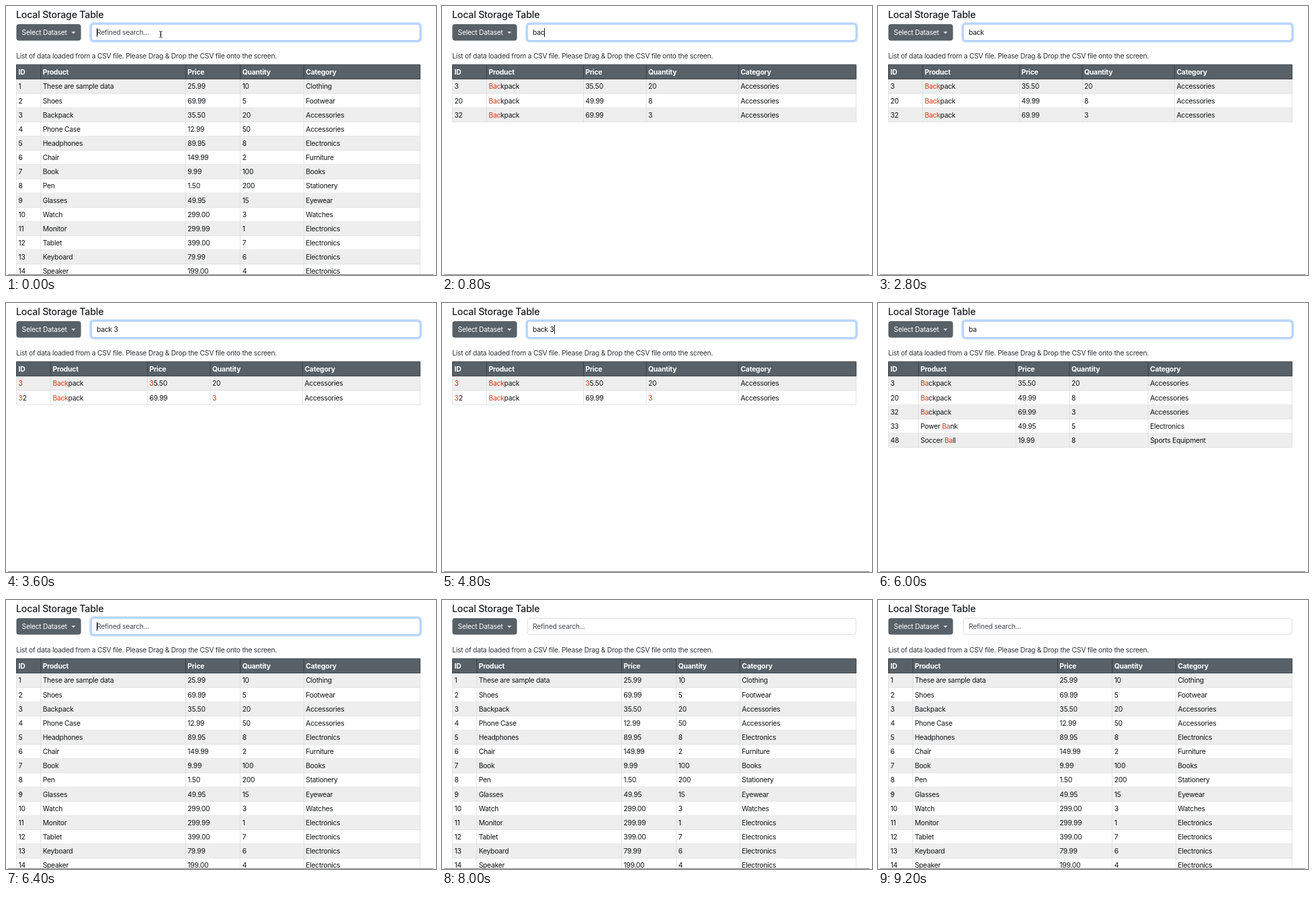
Write an HTML page that moves like this. It is 640 by 400 pixels and loops after 9.6 s.

```html
<!DOCTYPE html>
<html lang="en">
<head>
<meta charset="utf-8">
<title>Local Storage Table</title>
<style>
  html, body { margin: 0; width: 100%; height: 100%; overflow: hidden; background: #fff; }
  svg { display: block; width: 640px; height: 400px; }
  text {
    font: 400 10.35px Inter, "Liberation Sans", sans-serif;
    letter-spacing: -0.27px;
    fill: #111315;
    white-space: pre;
  }
  .title { font-size: 14.2px; font-weight: 500; letter-spacing: -0.2px; fill: #1c1f22; }
  .note { fill: #2f3336; }
  .light { fill: #fff; }
  .head { font-weight: 700; letter-spacing: -0.2px; fill: #fff; }
  .hint { fill: #45494d; }
  .hit { fill: #dc3513; }
  .dark { fill: #586168; }
  .stripe { fill: #eeeeee; }
  .rule { stroke: #dadcde; stroke-width: 0.8; }
  .headRule { stroke: #3b4247; stroke-width: 1; }
  #glow { fill: #c2dbfe; }
  #field { fill: #fff; stroke: #ced4da; stroke-width: 0.8; }
  .focus #field { stroke: #86b7fe; }
  svg:not(.focus) #glow { display: none; }
</style>
</head>
<body>
<svg id="stage" viewBox="0 0 640 400">
  <rect width="640" height="400" fill="#fff"/>
  <text class="title" x="15" y="18.1">Local Storage Table</text>
  <rect class="dark" x="15.4" y="27" width="96.2" height="24.4" rx="4"/>
  <text class="light" x="23.6" y="43">Select Dataset</text>
  <path class="light" d="M97.3 38.2h6l-3 3z"/>
  <rect id="glow" x="124.2" y="24.2" width="494.8" height="30" rx="6"/>
  <rect id="field" x="127.1" y="27.1" width="489" height="24.2" rx="4"/>
  <text id="query" x="135" y="43"></text>
  <rect id="caret" y="33" width="1" height="13" fill="#111"/>
  <path id="beam" d="M228.2 37.4q2.2 0 2.2 1.6v6.2q0 1.6-2.2 1.6M232.6 37.4q-2.2 0-2.2 1.6v6.2q0 1.6 2.2 1.6M229.4 42.6h2"
        fill="none" stroke="#111" stroke-width="0.9"/>
  <text class="note" x="15.2" y="78.4">List of data loaded from a CSV file. Please Drag &amp; Drop the CSV file onto the screen.</text>
  <g id="table"></g>
  <path d="M3 399.5H636" stroke="#858585"/>
</svg>
<script>
const LOOP = 9600, TOP = 87.2, BODY = 109, ROW = 21.14, RIGHT = 616.3;
const HEAD = ["ID", "Product", "Price", "Quantity", "Category"];
const DATA = `1,These are sample data,25.99,10,Clothing
2,Shoes,69.99,5,Footwear
3,Backpack,35.50,20,Accessories
4,Phone Case,12.99,50,Accessories
5,Headphones,89.95,8,Electronics
6,Chair,149.99,2,Furniture
7,Book,9.99,100,Books
8,Pen,1.50,200,Stationery
9,Glasses,49.95,15,Eyewear
10,Watch,299.00,3,Watches
11,Monitor,299.99,1,Electronics
12,Tablet,399.00,7,Electronics
13,Keyboard,79.99,6,Electronics
14,Speaker,199.00,4,Electronics
20,Backpack,49.99,8,Accessories
32,Backpack,69.99,3,Accessories
33,Power Bank,49.95,5,Electronics
48,Soccer Ball,19.99,8,Sports Equipment`.split("\n").map(line => line.split(","));

const WIDE = [15.5, 51.7, 267.3, 348.7, 443.3];
const MEDIUM = [15.5, 60.3, 205.3, 285, 402];
const NARROW = [15.5, 66.4, 210.5, 304, 441.4];

// start time, typed text, caret shown, field focused, pointer shown
const STEPS = [
  [0, "", 1, 1, 1],
  [800, "bac", 1, 1, 0],
  [1200, "back", 1, 1, 0],
  [2800, "back", 0, 1, 0],
  [3600, "back 3", 0, 1, 0],
  [4000, "back 35", 0, 1, 0],
  [4400, "back 35", 1, 1, 0],
  [4800, "back 3", 1, 1, 0],
  [5200, "back", 1, 1, 0],
  [5600, "bac", 0, 1, 0],
  [6000, "ba", 0, 1, 0],
  [6400, "", 1, 1, 0],
  [7600, "", 0, 1, 0],
  [8000, "", 0, 0, 0]
];

const $ = id => document.getElementById(id);
const stage = $("stage"), query = $("query"), caret = $("caret");
const label = (x, y, text, cls = "") => `<text class="${cls}" x="${x}" y="${y}">${text}</text>`;
const line = (d, cls) => `<path class="${cls}" d="${d}"/>`;

function mark(cell, words) {
  if (!words.length) return cell;
  return cell.replace(new RegExp(words.join("|"), "gi"), '<tspan class="hit">$&</tspan>');
}

function drawTable(typed) {
  const words = typed.split(" ").filter(Boolean);
  const rows = words.length
    ? DATA.filter(row => words.every(w => row.some(cell => cell.toLowerCase().includes(w))))
    : DATA.slice(0, 14);
  const cols = !words.length ? WIDE : typed === "ba" ? MEDIUM : NARROW;
  const width = RIGHT - cols[0], bottom = BODY + rows.length * ROW;
  let out = `<rect class="dark" x="${cols[0]}" y="${TOP}" width="${width}" height="${BODY - TOP}"/>`;
  rows.forEach((row, i) => {
    const y = BODY + i * ROW;
    if (i % 2 === 0) out += `<rect class="stripe" x="${cols[0]}" y="${y}" width="${width}" height="${ROW}"/>`;
    out += line(`M${cols[0]} ${y + ROW}H${RIGHT}`, "rule");
    row.forEach((cell, c) => out += label(cols[c] + 3, y + 14.4, mark(cell, words)));
  });
  [...cols, RIGHT].forEach(x => {
    out += line(`M${x} ${BODY}V${bottom}`, "rule") + line(`M${x} ${TOP}V${BODY}`, "headRule");
  });
  out += line(`M${cols[0]} ${TOP}H${RIGHT}M${cols[0]} ${BODY - 0.4}H${RIGHT}`, "headRule");
  HEAD.forEach((name, c) => out += label(cols[c] + 3, 102, name, "head"));
  $("table").innerHTML = out;
}

let current;
function show(step) {
  const [, typed, caretOn, focused, pointer] = step;
  if (!current || current[1] !== typed) drawTable(typed);
  query.textContent = typed || "Refined search...";
  query.setAttribute("class", typed ? "" : "hint");
  caret.setAttribute("x", Math.round(135 + (typed ? query.getComputedTextLength() : 0)));
  caret.style.visibility = caretOn ? "visible" : "hidden";
  $("beam").style.visibility = pointer ? "visible" : "hidden";
  stage.classList.toggle("focus", !!focused);
  current = step;
}

const start = performance.now();
function tick() {
  const t = Math.max(0, performance.now() - start) % LOOP;
  const step = STEPS.filter(s => s[0] <= t).pop();
  if (step !== current) show(step);
  requestAnimationFrame(tick);
}
tick();
</script>
</body>
</html>
```
